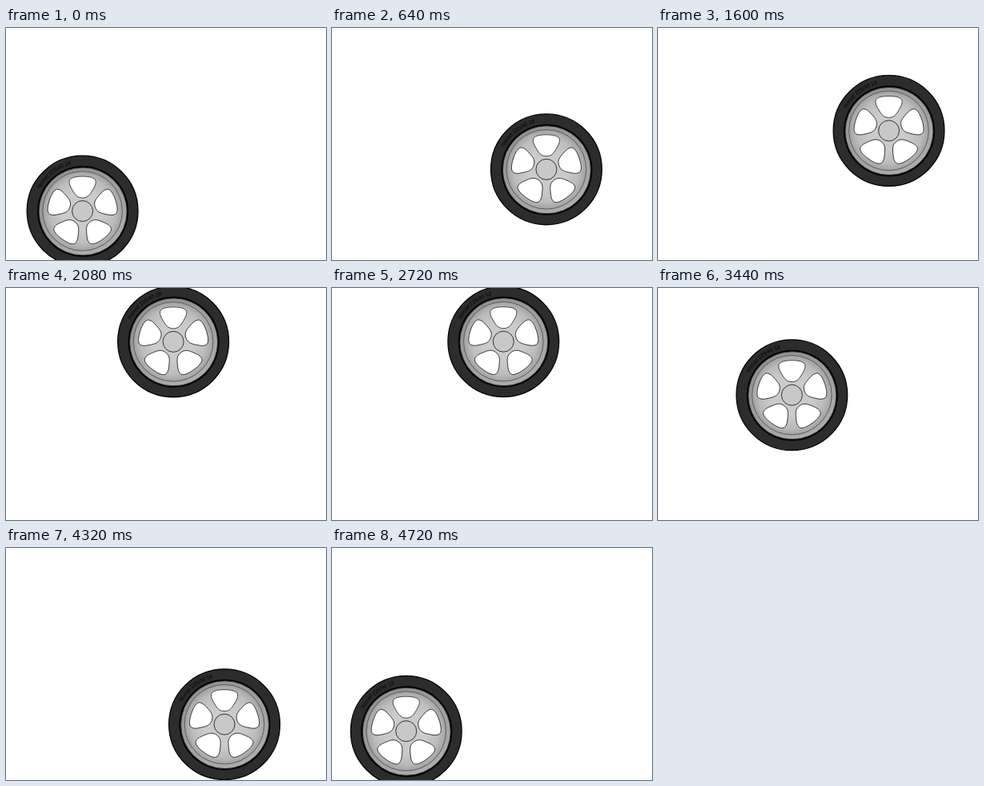
An HTML page that plays this animation: 400 px wide and 291 px high, repeating every 4800 ms.

```html
<!DOCTYPE html>
<html lang="en">
<head>
<meta charset="utf-8">
<title>Wheel</title>
<style>
  html, body { margin: 0; width: 100%; height: 100%; overflow: hidden; background: #fff; }
  svg { display: block; width: 100vw; height: 100vh; }
  text { font: 6.6px "Liberation Sans", Arial, sans-serif; fill: #000; }
</style>
</head>
<body>
<svg viewBox="0 0 400 291">
  <defs>
    <radialGradient id="face">
      <stop offset=".5" stop-color="#cbcbcb"/>
      <stop offset=".82" stop-color="#bcbcbc"/>
      <stop offset="1" stop-color="#a2a2a2"/>
    </radialGradient>
    <linearGradient id="lip" x1="0" y1="0" x2=".6" y2="1">
      <stop offset="0" stop-color="#8c8c8c"/>
      <stop offset="1" stop-color="#acacac"/>
    </linearGradient>
    <path id="arc" d="M-60 0A60 60 0 0 1 60 0"/>
    <path id="hole" d="M0-16.5C7-16.5 9.5-21 12.5-26C15.5-31 17-34 16.5-37.5C16-42 8-43.5 0-43.5C-8-43.5-16-42-16.5-37.5C-17-34-15.5-31-12.5-26C-9.5-21-7-16.5 0-16.5Z"/>
    <!-- the zigzag the hub follows, from the bottom left to the top left -->
    <path id="track" d="M76 230L308 219C303 203 292 178 280 176.5L112 181C97 181.5 86 163 83 137.5L330 126.5C328 95 320 64 300 63.5L69.5 72"/>
  </defs>
  <g id="wheel">
    <circle r="69.4" fill="#2c2c2c" stroke="#000" stroke-width="1.3"/>
    <text><textPath href="#arc" startOffset="15.5%">Norvel 225/40 18</textPath></text>
    <circle cx=".5" cy=".5" r="57"/>
    <circle cx=".5" cy=".5" r="55" fill="url(#lip)" stroke="#222" stroke-width=".8"/>
    <circle r="49.8" fill="url(#face)" stroke="#555" stroke-width=".9"/>
    <g id="holes" fill="#fff" stroke="#333" stroke-width=".9"></g>
    <circle r="13" fill="#c8c8c8" stroke="#333"/>
  </g>
</svg>
<script>
const STEP = 80, COUNT = 60;  // ms per step, steps per loop
const TOP = 30;               // step at which the wheel reaches the top
const LEAD = 0.55;            // steps already under way when the loop starts
const wheel = document.getElementById('wheel');
const track = document.getElementById('track');
const length = track.getTotalLength();

document.getElementById('holes').innerHTML = [0, 1, 2, 3, 4]
  .map(i => `<use href="#hole" transform="rotate(${i * 72})"/>`).join('');

// Steady speed up the track, then steady speed back down.
function progress(step) {
  return step < TOP
    ? (step + LEAD) / (TOP + LEAD)
    : (COUNT - LEAD - step) / (COUNT - LEAD - TOP);
}

function draw() {
  const step = Math.floor(performance.now() / STEP) % COUNT;
  const { x, y } = track.getPointAtLength(length * progress(step));
  wheel.setAttribute('transform', `translate(${x + 0.5} ${y + 0.5})`);
  requestAnimationFrame(draw);
}
draw();
</script>
</body>
</html>
```
